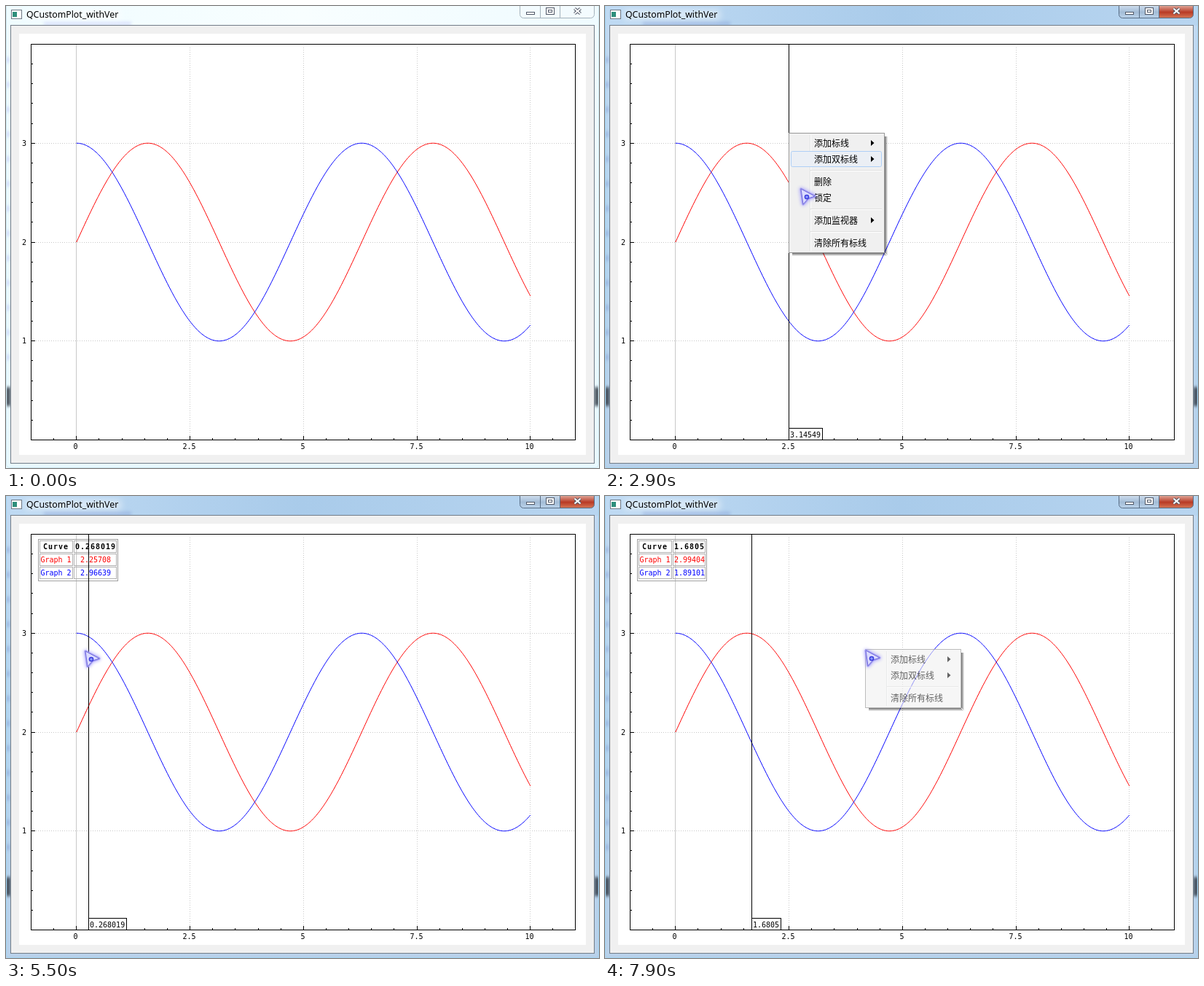
Animation of 814x634 px, one loop 8 s. Source, as an HTML page with a canvas:

```html
<!DOCTYPE html>
<html lang="zh">
<head>
<meta charset="utf-8">
<title>Plot with marker lines</title>
<style>
html, body { margin: 0; width: 100%; height: 100%; overflow: hidden; background: #fff; }
canvas { display: block; }
</style>
</head>
<body>
<canvas id="stage" width="814" height="634"></canvas>
<script>
const ctx = document.getElementById('stage').getContext('2d');
const LOOP = 8000, STEP = 100;
const MONO = '10px "DejaVu Sans Mono", monospace';
const BOLD = 'bold 10px "DejaVu Sans Mono", monospace';
const CJK = '12px "Noto Sans CJK SC", "Noto Sans CJK", sans-serif';

// Plot coordinates
const LEFT = 34, UNIT_X = 62.3019, UNIT_Y = 135.75;
const px = v => LEFT + 0.5 + (v + 1) * UNIT_X;
const py = v => 595.5 - v * UNIT_Y;
const toValue = x => (x - LEFT) / UNIT_X - 1;
const snap = v => Math.floor(v) + 0.5;
const fmt = v => String(+v.toPrecision(6));
const clamp = (v, lo, hi) => Math.min(hi, Math.max(lo, v));
const curves = [
  { name: 'Graph 1', color: '#f00', f: x => 2 + Math.sin(x) },
  { name: 'Graph 2', color: '#00f', f: x => 2 + Math.cos(x) }
];

// Pointer stops: time, x, y. From DRAG to DROP the marker line follows it.
const DRAG = 4700, DROP = 7300, GRIP = 4;
const stops = [
  [100, 790, 66], [700, 253, 169], [900, 253, 169], [1100, 299, 185], [1600, 392, 182],
  [2200, 247, 176], [2800, 253, 175], [3000, 285, 324], [3700, 411, 290], [3900, 411, 290],
  [DRAG, 248, 209], [5100, 367, 209], [5500, 109, 212], [5700, 76, 209], [5800, 76, 209],
  [6600, 719, 249], [6800, 719, 249], [7100, 247, 239], [DROP, 197, 236], [7500, 197, 236],
  [7800, 358, 211]
];

function pointerAt(t) {
  const n = stops.findIndex(s => s[0] > t);
  const b = stops.at(n), a = n > 0 ? stops[n - 1] : b;
  const k = n > 0 ? (t - a[0]) / (b[0] - a[0]) : 0;
  const e = k * k * (3 - 2 * k);
  return [1, 2].map(i => Math.round(a[i] + (b[i] - a[i]) * e));
}

function rect(x, y, w, h, fill, stroke) {
  if (fill) { ctx.fillStyle = fill; ctx.fillRect(x, y, w, h); }
  if (stroke) { ctx.strokeStyle = stroke; ctx.strokeRect(x + 0.5, y + 0.5, w - 1, h - 1); }
}

function roundRect(x, y, w, h, r, fill, stroke) {
  ctx.beginPath();
  ctx.roundRect(x, y, w, h, r);
  if (fill) { ctx.fillStyle = fill; ctx.fill(); }
  if (stroke) { ctx.strokeStyle = stroke; ctx.stroke(); }
}

function line(x1, y1, x2, y2, color, dash = []) {
  ctx.strokeStyle = color;
  ctx.setLineDash(dash);
  ctx.beginPath();
  ctx.moveTo(x1, y1);
  ctx.lineTo(x2, y2);
  ctx.stroke();
  ctx.setLineDash([]);
}

function text(s, x, y, font, color = '#000', align = 'left', spacing = 0) {
  ctx.font = font;
  ctx.fillStyle = color;
  ctx.textAlign = align;
  ctx.letterSpacing = spacing + 'px';
  ctx.fillText(s, x, y);
  ctx.letterSpacing = '0px';
}

function gradient(x1, y1, x2, y2, colors) {
  const g = ctx.createLinearGradient(x1, y1, x2, y2);
  colors.forEach((c, i) => g.addColorStop(i / (colors.length - 1), c));
  return g;
}

function blurred(radius, paint) {
  ctx.save();
  ctx.filter = `blur(${radius}px)`;
  paint();
  ctx.restore();
}

function glass(active) {
  const side = active ? ['#c3daf2', '#b4d5f0', '#b9d1ea'] : ['#f0fcff', '#e8f9ff'];
  const top = active ? ['#bfdaf3', '#a9cbea', '#b8d5f0'] : ['#effcff', '#f8feff', '#effbff'];
  rect(0, 0, 814, 634, gradient(0, 0, 0, 634, side));
  rect(0, 0, 814, 27, gradient(0, 0, 814, 0, top));
  blurred(2, () => {
    const ink = active ? 'rgba(90,110,190,.3)' : 'rgba(150,150,245,.3)';
    rect(52, 22, 120, 4, ink);
    for (let y = 70; y < 500; y += 34) rect(0, y, 5, 8, ink);
    for (const x of [0, 808]) rect(x, 523, 6, 26, '#343d48');
  });
  roundRect(0.5, -8, 813, 641.5, 5, null, active ? '#a2d4f2' : '#cfe9f2');
}

function buttons(active) {
  const edge = active ? '#586d85' : '#a5b2bb';
  const plain = active ? gradient(0, 0, 0, 17, ['#cbdbec', '#a3bcd6', '#bdd5ec']) : '#f3fbfe';
  const close = active ? gradient(0, 0, 0, 17, ['#dda092', '#b93b26', '#d77a58']) : '#f3fbfe';
  roundRect(705.5, -6, 55, 22.5, [0, 0, 0, 5], plain, edge);
  roundRect(760.5, -6, 47, 22.5, [0, 0, 5, 0], close, edge);
  line(733.5, 0, 733.5, 16, edge);
  rect(714, 8, 12, 4, '#fff', '#505867');
  rect(741, 2, 12, 10, '#fff', '#505867');
  rect(744, 5, 6, 4, '#fff', '#505867');
  for (const [w, c] of [[4.2, '#505867'], [2, '#fff']]) {
    ctx.lineWidth = w;
    line(780.5, 3.5, 788.5, 10.5, c);
    line(788.5, 3.5, 780.5, 10.5, c);
  }
  ctx.lineWidth = 1;
}

function windowFrame(t) {
  glass(false);
  buttons(false);
  ctx.globalAlpha = clamp(t / 300, 0, 1);
  glass(true);
  buttons(true);
  ctx.globalAlpha = 1;
  blurred(5, () => rect(26, 5, 132, 14, 'rgba(255,255,255,.5)'));
  rect(7, 5, 15, 13, '#fff', '#6f7884');
  rect(9, 8, 6, 7, '#2f8f7c');
  text('QCustomPlot_withVer', 28, 16, '12.3px "Noto Sans", "Open Sans", sans-serif');
  rect(6, 26, 802, 602, '#f0f0f0', '#737d88');
  rect(18, 38, 778, 578, '#fff');
}

function plot() {
  const grid = '#c8c8c8';
  for (let v = 2.5; v <= 10; v += 2.5) line(snap(px(v)), 595, snap(px(v)), 53, grid, [1, 2]);
  for (let v = 1; v <= 3; v++) line(35, snap(py(v)), 781, snap(py(v)), grid, [1, 2]);
  line(snap(px(0)), 53, snap(px(0)), 595, grid);
  for (const c of curves) {
    ctx.strokeStyle = c.color;
    ctx.beginPath();
    for (let i = 0; i <= 500; i++) ctx.lineTo(px(i / 50), py(c.f(i / 50)));
    ctx.stroke();
  }
  rect(34, 52, 748, 544, null, '#000');
  for (let i = -1; i <= 21; i++) {
    const x = snap(px(i / 2)), major = i % 5 === 0;
    line(x, 595, x, major ? 590 : 593, '#000');
    if (major) text(String(i / 2), x - 1, 608, MONO, '#000', 'center');
  }
  for (let i = 1; i < 20; i++) {
    const y = snap(py(i / 5)), major = i % 5 === 0;
    line(35, y, major ? 40 : 37, y, '#000');
    if (major) text(String(i / 5), 28, y + 3.5, MONO, '#000', 'right');
  }
}

function table(value) {
  const sample = clamp(Math.floor(value * 100) / 100, 0, 10);
  const head = fmt(value);
  const w = Math.max(head.length * 7, 42) + 2;
  const rows = [['Curve', head, '#000'], ...curves.map(c => [c.name, fmt(c.f(sample)), c.color])];
  rect(44, 59, w + 52, 58, null, '#a0a0a0');
  rows.forEach(([a, b, color], i) => {
    const y = 61 + i * 18;
    const font = i ? MONO : BOLD, gap = i ? 0 : 1;
    rect(46, y, 46, 17, null, '#b0b0b0');
    rect(93, y, w + 1, 17, null, '#b0b0b0');
    text(a, 68.5, y + 12, font, color, 'center', gap);
    text(b, 94 + w / 2, y + 12, font, color, 'center', gap);
  });
}

function marker(x, label) {
  line(x + 0.5, 53, x + 0.5, 595, '#000');
  const w = label.length * 6 + 5;
  const left = x > 600 ? x - w + 1 : x;
  rect(left, 579, w, 17, '#fff', '#000');
  text(label, left + 2, 592, MONO);
}

// Items: a string, or '-' for a separator; a trailing '>' means a submenu
function menu(x, y, w, items, hot = -1, alpha = 1) {
  const h = items.reduce((s, it) => s + (it === '-' ? 9 : 22), 5);
  for (let i = 0; i < 4; i++) {
    const shade = `rgba(0,0,0,${0.5 - i * 0.13})`;
    rect(x + w + i, y + 4, 1, h - 4 + i, shade);
    rect(x + 4, y + h + i, w - 4 + i, 1, shade);
  }
  ctx.globalAlpha = alpha;
  rect(x - 1, y - 1, w + 1, h + 1, '#f0f0f0', '#979797');
  line(x + 28.5, y + 2, x + 28.5, y + h - 3, '#e2e3e3');
  line(x + 29.5, y + 2, x + 29.5, y + h - 3, '#fff');
  let top = y + 2;
  items.forEach((it, i) => {
    if (it === '-') {
      line(x + 29, top + 4.5, x + w - 4, top + 4.5, '#e0e0e0');
      line(x + 29, top + 5.5, x + w - 4, top + 5.5, '#fff');
      top += 9;
      return;
    }
    if (i === hot) roundRect(x + 2.5, top + 0.5, w - 7, 21, 2, '#ebeff5', '#aecff7');
    text(it.replace('>', ''), x + 34, top + 15.5, CJK);
    if (it.endsWith('>')) {
      ctx.fill(new Path2D(`M${x + 112} ${top + 7}l4.5 4l-4.5 4z`));
    }
    top += 22;
  });
  ctx.globalAlpha = 1;
}

function cursor([x, y]) {
  const arrow = new Path2D('M0 1L19 11L10 14L3 22Z');
  ctx.save();
  ctx.translate(x, y);
  ctx.lineJoin = 'round';
  ctx.shadowColor = '#8c84ff';
  ctx.shadowBlur = 5;
  ctx.lineWidth = 3;
  ctx.strokeStyle = '#a09af2';
  ctx.stroke(arrow);
  ctx.shadowColor = 'transparent';
  ctx.fillStyle = '#dcdcff';
  ctx.fill(arrow);
  ctx.lineWidth = 1;
  ctx.strokeStyle = '#7670dc';
  ctx.stroke(arrow);
  ctx.lineWidth = 1.5;
  ctx.beginPath();
  ctx.arc(8, 12, 2.6, 0, 7);
  ctx.fillStyle = '#8c9cff';
  ctx.fill();
  ctx.strokeStyle = '#3c3cdc';
  ctx.stroke();
  ctx.restore();
}

const add = ['添加标线>', '添加双标线>'];
const clear = ['-', '清除所有标线'];
const full = [...add, '-', '删除', '锁定', '-', '添加监视器>', ...clear];

function menus(t) {
  if (t >= 800 && t < 1800) {
    menu(253, 169, 131, add, t >= 1000 ? 0 : -1, t < 900 ? 0.5 : 1);
    if (t >= 1400) menu(380, 169, 90, ['垂直标线', '水平标线', '十字标线'], t >= 1600 ? 0 : -1);
  }
  if (t >= 2800 && t < 3900) {
    const hot = t < 2900 ? -1 : t < 3000 ? 1 : t < 3200 ? 8 : 6;
    menu(253, 175, 131, full, hot, t < 2900 ? 0.5 : 1);
    if (t >= 3400) menu(380, 281, 68, ['表格'], t >= 3600 ? 0 : -1);
  }
  if (t >= 7900) menu(358, 211, 131, [...add, ...clear], -1, 0.6);
}

function draw(t) {
  windowFrame(t);
  plot();
  const x = pointerAt(clamp(t, DRAG, DROP))[0] + GRIP;
  const value = toValue(x);
  if (t >= 3900) table(value);
  if (t >= 1800) marker(x, t <= DRAG ? '3.14549' : fmt(value));
  menus(t);
  if (t >= 100) cursor(pointerAt(t));
}

let start = null, last = -1;
function tick(now) {
  if (start === null) start = now;
  const t = Math.floor(((now - start) % LOOP) / STEP) * STEP;
  if (t !== last) draw(last = t);
  requestAnimationFrame(tick);
}
draw(0);
requestAnimationFrame(tick);
</script>
</body>
</html>
```
